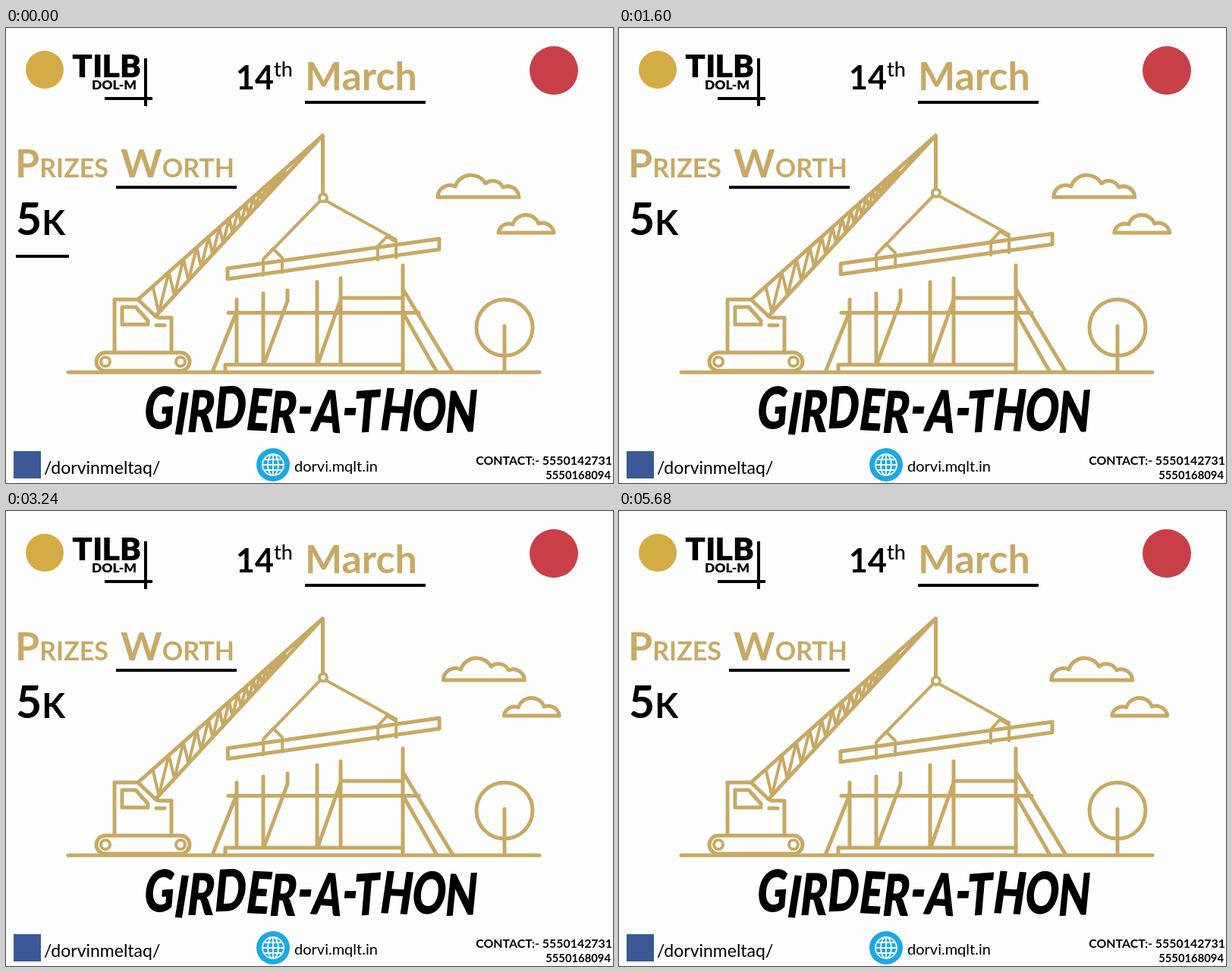
An HTML page for the animation above (5760 ms loop, 800 by 600 pixels).

```html
<!DOCTYPE html>
<html lang="en">
<head>
<meta charset="utf-8">
<title>Girder-a-thon</title>
<style>
html, body { margin: 0; width: 100%; height: 100%; overflow: hidden; background: #fdfdfd; }
svg { display: block; width: 800px; height: 600px; font-family: Lato, "Open Sans", sans-serif; }
.art { fill: none; stroke: #c8a964; stroke-width: 5; stroke-linecap: round; stroke-linejoin: round; }
.thin { stroke-width: 4; }
.rule { fill: none; stroke: #000; stroke-width: 4; }
.b { font-weight: 700; }
.gold { fill: #c8a964; }
.end { text-anchor: end; }
</style>
</head>
<body>
<svg viewBox="0 0 800 600">
  <!-- header -->
  <circle cx="51" cy="55" r="25" fill="#d3ac43"/>
  <text x="87" y="65" font-family="Roboto, sans-serif" font-weight="900" font-size="43">TILB</text>
  <text x="113" y="81" font-weight="900" font-size="17.500">DOL-M</text>
  <path class="rule" d="M184 40V103M130 93H193"/>
  <text x="303" y="81" class="b" font-size="43">14</text>
  <text x="353" y="64" font-weight="500" font-size="27">th</text>
  <text x="394" y="82" class="b gold" font-size="52">March</text>
  <path class="rule" d="M394 98H553M145 210H304"/>
  <circle cx="722" cy="56" r="32" fill="#c93f48"/>

  <!-- prize -->
  <g class="b gold" font-size="34">
    <text x="12" y="197"><tspan font-size="52">P</tspan>RIZES</text>
    <text x="151" y="197"><tspan font-size="52">W</tspan>ORTH</text>
  </g>
  <text x="13" y="273" class="b" font-size="59">5<tspan font-size="45">K</tspan></text>
  <path id="flash" class="rule" d="M13 301H83"/>

  <!-- scene -->
  <g class="art">
    <path d="M82 454H703"/>
    <path d="M131 428H230A12 12 0 0 1 230 452H131A12 12 0 0 1 131 428"/>
    <g class="thin"><circle cx="131" cy="440" r="6"/><circle cx="230" cy="440" r="6"/></g>
    <path d="M143 428V358H174L197 380L201 382H218V428M153 368H171L187 386V391H153ZM198 392H209"/>
    <path d="M174 358L417 142L197 380"/>
    <path id="lattice" class="thin"/>
    <path d="M289 452V444H523M304 358V444M339 350V444M371 346V360L340 443M410 335V444M441 330V444M441 358L411 443"/>
    <path d="M523 313V452M293 375.500H544M441 356H523M304 374L273 451M523 344L588 452M523 375L567 452"/>
    <circle cx="657" cy="395" r="37"/><path d="M657 393V452"/>
    <path id="cable"/>
    <g id="load">
      <circle class="thin" cx="418" cy="224" r="5"/>
      <path class="thin" d="M414 228L341 303M422 228L514 279"/>
      <path d="M292 317L571 278V292L292 331Z"/>
      <path class="thin" d="M339 326V305L352 291L364 303V322M490 306V288L502 275L514 282V303"/>
    </g>
    <g id="clouds">
      <path d="M569 223A16 16 0 0 1 592 209A22 22 0 0 1 632 205A15 15 0 0 1 655 210A15 15 0 0 1 676 223Z"/>
      <path d="M649 270A14 14 0 0 1 668 259A18 18 0 0 1 702 258A15 15 0 0 1 722 270Z"/>
    </g>
  </g>

  <!-- title -->
  <text transform="translate(400 530) skewX(-7) scale(1 1.4)" text-anchor="middle" font-weight="900" font-size="54.500"
    dy="0 4 -2 -3 1 3 -5 3 -2 4 -3 1 2" rotate="-3 3 0 -2 2 0 0 3 0 -3 2 0 -2">GIRDER-A-THON</text>

  <!-- footer -->
  <rect x="10" y="558" width="36" height="36" fill="#3b5998"/>
  <text x="50" y="588" font-size="23">/dorvinmeltaq/</text>
  <circle cx="352" cy="576" r="22" fill="#1ca8e6"/>
  <g fill="none" stroke="#fff" stroke-width="1.800">
    <circle cx="352" cy="576" r="14"/><ellipse cx="352" cy="576" rx="7" ry="14"/>
    <path d="M352 562V590M338 576H366M340 569H364M340 583H364"/>
  </g>
  <text x="380" y="585" font-size="20">dorvi.mqlt.in</text>
  <text x="799" y="576" class="b end" font-size="15.900">CONTACT:- 5550142731</text>
  <text x="797" y="595" class="b end" font-size="14.800">5550168094</text>
</svg>
<script>
const LOOP = 5760;
const $ = id => document.getElementById(id);

// Steep and slanted braces in turn along the boom, closer towards the tip.
const tip = [417, 142], upper = [174, 358], lower = [197, 380];
const along = (from, left) => from.map((v, i) => tip[i] + (v - tip[i]) * left).join(' ');
let braces = '';
for (let i = 0; i < 16; i++) {
  const left = 0.905 ** i;
  braces += (i ? 'L' : 'M') + along(upper, 0.92 * left) + 'L' + along(lower, 0.98 * left);
}
$('lattice').setAttribute('d', braces);

// Eased value from a list of [time, value] keys.
function ease(t, keys) {
  let i = 1;
  while (i < keys.length - 1 && t > keys[i][0]) i++;
  const [t0, a] = keys[i - 1], [t1, b] = keys[i];
  const p = Math.min(1, Math.max(0, (t - t0) / (t1 - t0)));
  return a + (b - a) * (1 - Math.cos(Math.PI * p)) / 2;
}

function draw(t) {
  const lift = ease(t, [[0, 0], [480, -6.5], [3000, -6.5], [3650, 0]]);
  const swing = ease(t, [[0, 0], [480, 0.6], [2520, -0.6], [3600, 0]]);
  const drift = 3.65 * (1 - Math.cos(2 * Math.PI * t / 6300));
  $('load').setAttribute('transform', `translate(0 ${lift}) rotate(${swing} 418 224)`);
  $('cable').setAttribute('d', `M417.500 142V${218 + lift}`);
  $('clouds').setAttribute('transform', `translate(${drift} 0)`);
  $('flash').style.display = t < 40 ? '' : 'none';
}

const start = performance.now();
function tick() {
  draw((performance.now() - start) % LOOP);
  requestAnimationFrame(tick);
}
tick();
</script>
</body>
</html>
```
